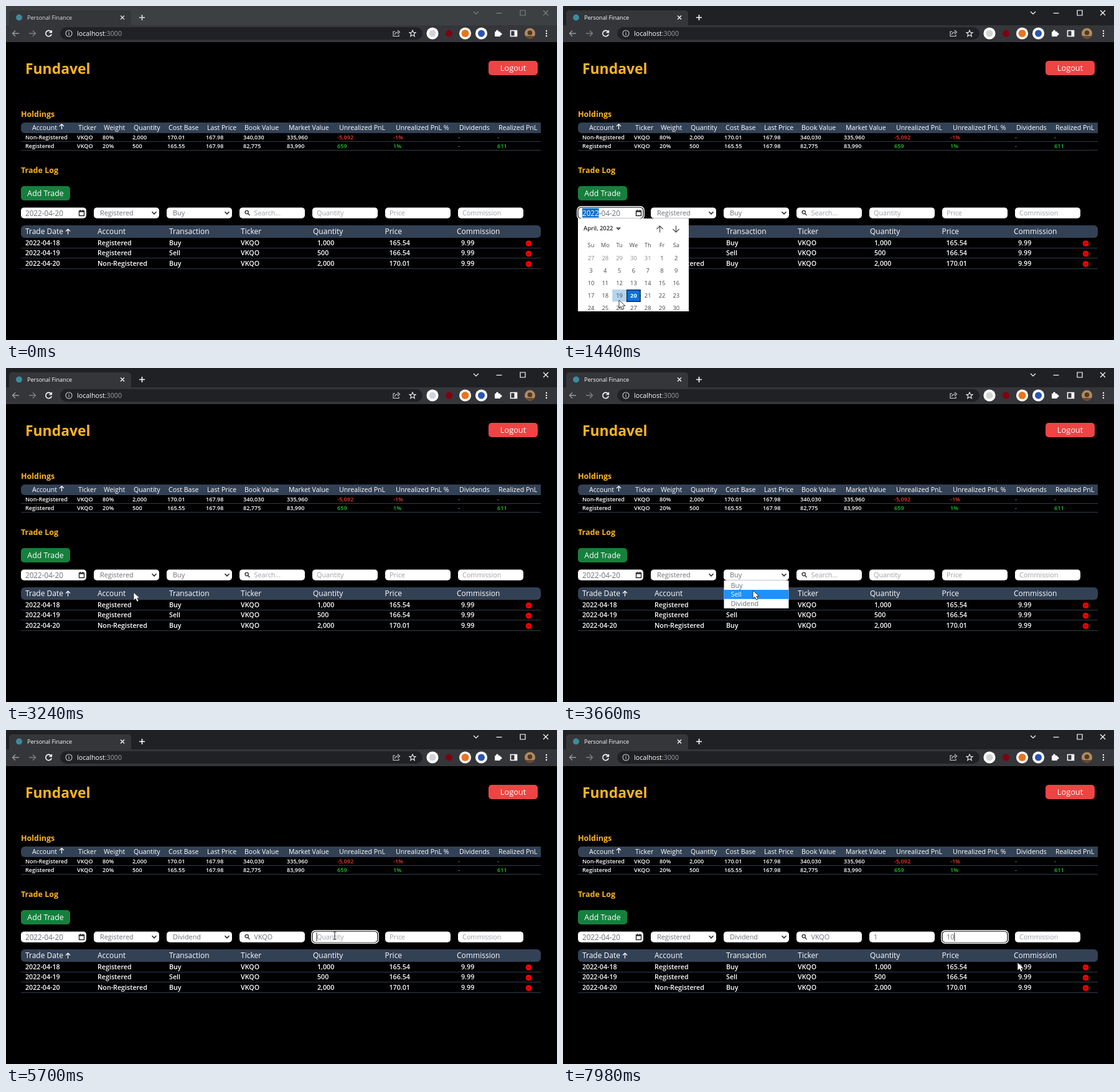
Write an HTML page with a canvas that moves like this. It is 885x536 px and loops after 8000 ms.

```html
<!DOCTYPE html>
<html lang="en">
<head>
<meta charset="utf-8">
<title>Personal Finance</title>
<style>
html, body { margin: 0; width: 100%; height: 100%; overflow: hidden; background: #000; }
canvas { display: block; }
</style>
</head>
<body>
<canvas id="stage" width="885" height="536"></canvas>
<script>
const c = document.getElementById('stage').getContext('2d');
const LOOP = 8000, STEP = 60;
const WHITE = '#fff', AMBER = '#fbb424', SLATE = '#334155', RULE = '#303c4c', INK = '#27272a';
const GREEN = '#22c52e', RED = '#f03a2e', MUTED = '#6b7078', HINT = '#9ca0a8', BLUE = '#1e90ff';
const TICKER = 'VKQO';

const HEADS = ['Account', 'Ticker', 'Weight', 'Quantity', 'Cost Base', 'Last Price', 'Book Value',
  'Market Value', 'Unrealized PnL', 'Unrealized PnL %', 'Dividends', 'Realized PnL'];
const HEAD_X = [42, 116, 157, 205, 261, 323, 383, 454, 535, 626, 728, 791];
const CELL_X = [31, 114, 155, 203, 259, 321, 381, 451, 532, 622, 726, 789];
const HOLDINGS = [
  ['Non-Registered', TICKER, '80%', '2,000', '170.01', '167.98', '340,030', '335,960', '-5,092', '-1%', '-', '-'],
  ['Registered', TICKER, '20%', '500', '165.55', '167.98', '82,775', '83,990', '659', '1%', '-', '611']
];
const LOG_HEADS = ['Trade Date', 'Account', 'Transaction', 'Ticker', 'Quantity', 'Price', 'Commission'];
const LOG_X = [31, 147, 262, 377, 493, 608.5, 724];
const LOG = [
  ['2022-04-18', 'Registered', 'Buy', TICKER, '1,000', '165.54', '9.99'],
  ['2022-04-19', 'Registered', 'Sell', TICKER, '500', '166.54', '9.99'],
  ['2022-04-20', 'Non-Registered', 'Buy', TICKER, '2,000', '170.01', '9.99']
];

// Pointer stops: time, x, y
const PATH = [
  [60, 2, 456], [660, 92, 332], [780, 92, 332], [960, 121, 331], [1080, 121, 331],
  [1440, 90, 472], [1740, 92, 470], [2040, 236, 331], [2160, 236, 331], [2400, 208, 363],
  [2640, 205, 360], [3240, 205, 360], [3420, 350, 331], [3480, 350, 331], [3660, 305, 357],
  [4020, 300, 374], [4140, 300, 374], [4380, 427, 331], [4920, 427, 331], [5160, 528, 330],
  [6420, 528, 330], [6720, 640, 330], [6780, 640, 330], [7080, 730, 373]
];

function text(s, x, y, size, color = WHITE, weight = 400, align = 'left') {
  c.font = `${weight} ${size}px "Open Sans", "Noto Sans", sans-serif`;
  c.fillStyle = color;
  c.textAlign = align;
  c.fillText(s, x, y + size * 0.36);
  return c.measureText(s).width;
}

function box(x, y, w, h, color, r = 0) {
  c.fillStyle = color;
  c.beginPath();
  c.roundRect(x, y, w, h, r);
  c.fill();
}

function disc(x, y, r, color) {
  c.fillStyle = color;
  c.beginPath();
  c.arc(x, y, r, 0, 7);
  c.fill();
}

function line(d, color, width = 1, x = 0, y = 0) {
  c.save();
  c.translate(x, y);
  c.strokeStyle = color;
  c.lineWidth = width;
  c.stroke(new Path2D(d));
  c.restore();
}

const rule = y => box(24, y, 835, 1, RULE);
const between = (t, a, b) => t >= a && t < b;
const upArrow = (x, y) => line('M0 4.5V-4M-3.5 -.5L0 -4L3.5 -.5', WHITE, 1.2, x, y);

function browser(active) {
  const on = active ? WHITE : '#dfe0e2', ctl = active ? WHITE : '#7c8084';
  const bar = '#35363a';
  box(0, 0, 885, 32, active ? '#202124' : '#3c4043');
  box(5, 7, 196, 30, bar, 5);
  box(0, 31, 885, 27, bar);
  disc(21, 18.5, 5, '#3a8c9c');
  text('Personal Finance', 34, 18.5, 9.1, on);
  line('M-3 -3L3 3M3 -3L-3 3', on, 1.3, 187, 18.5);
  line('M-4.5 0H4.5M0 -4.5V4.5', on, 1.6, 218.5, 18.5);
  line('M-4 -2L0 2L4 -2', ctl, 1.2, 755, 11);
  line('M-4.5 0H4.5', ctl, 1.2, 792, 11.5);
  line('M-4 -4H4V4H-4Z', ctl, 1.2, 830, 11);
  line('M-4 -4L4 4M4 -4L-4 4', ctl, 1.2, 867, 11);

  line('M5 0H-5M-1 -4.5L-5.5 0L-1 4.5', '#9a9ca0', 1.4, 16, 44);
  line('M-5 0H5M1 -4.5L5.5 0L1 4.5', '#7c8084', 1.4, 42, 44);
  line('M4 -2.5A4.7 4.7 0 1 0 4.6 1.2M4.8 -5V-1.5H1', WHITE, 1.6, 68.5, 44);
  box(87, 34, 582, 20, '#202124', 10);
  line('M5 0A5 5 0 1 1 -5 0A5 5 0 1 1 5 0M0 -.8V2.8M0 -3V-1.8', '#d0d2d5', 1.1, 101, 44);
  const w = text('localhost', 114, 44, 10.7, WHITE);
  text(':3000', 114 + w, 44, 10.7, '#9aa0a6');
  line('M-2 -3H-5V4.5H4V2M-2.5 2C-2 -1 0 -2 3 -2M2 -5L5.5 -2L2 1', '#d0d2d5', 1.1, 627, 44);
  line('M0 -5L1.5 -1.6L5 -1.4L2.3 1L3.2 4.6L0 2.6L-3.2 4.6L-2.3 1L-5 -1.4L-1.5 -1.6Z', '#e4e5e7', 1.2, 653, 44);

  for (const x of [685, 737.5, 763.5]) disc(x, 44, 9.6, WHITE);
  disc(685, 44, 5.5, '#d4d4d4');
  disc(711.5, 44, 5.5, '#800010');
  disc(737.5, 44, 6, '#e8741c');
  disc(763.5, 44, 5.5, '#2b55b0');
  box(785, 41, 9, 8, WHITE, 1);
  disc(789, 40.5, 2, WHITE);
  disc(794.5, 45, 2, WHITE);
  line('M-5 -4.5H5V4.5H-5Z', WHITE, 1.6, 815.5, 44);
  box(816.5, 40, 4, 8, WHITE);
  disc(841.5, 44, 8.5, '#b08a62');
  c.fillStyle = '#6b4a30';
  c.beginPath();
  c.arc(841.5, 44, 8.5, 0.5, 2.64);
  c.fill();
  disc(841.5, 43, 3.8, '#51391f');
  for (const y of [40, 44, 48]) disc(868, y, 1.2, WHITE);
}

function tables() {
  text('Fundavel', 31, 101, 22.9, AMBER, 700);
  box(775, 88, 79, 23, '#ef4444', 5);
  text('Logout', 814.5, 99.5, 12.8, WHITE, 400, 'center');

  text('Holdings', 24, 173, 12.5, AMBER, 700);
  box(24, 187, 835, 17, SLATE, [6, 0, 0, 6]);
  HEADS.forEach((s, i) => text(s, HEAD_X[i], 195.5, 10.6, WHITE, 500));
  upArrow(89.5, 193.5);
  HOLDINGS.forEach((row, r) => {
    row.forEach((s, i) => {
      const tint = i < 8 ? WHITE : i > 9 && s === '-' ? '#8a9099' : r ? GREEN : RED;
      text(s, CELL_X[i], 211 + r * 13.5, 9.1, tint, 600);
    });
    rule(217 + r * 14);
  });

  text('Trade Log', 24, 263.5, 12.5, AMBER, 700);
  box(24, 289, 79, 23, '#15803d', 5);
  text('Add Trade', 63.5, 300.5, 12.3, WHITE, 400, 'center');
  box(24, 352, 835, 20, SLATE, 6);
  LOG_HEADS.forEach((s, i) => text(s, LOG_X[i], 362, 12, WHITE, 500));
  upArrow(99.5, 362);
  LOG.forEach((row, r) => {
    const y = 380 + r * 16.5;
    row.forEach((s, i) => text(s, LOG_X[i] + (i > 3 ? 7 : 0), y, 10.7, WHITE, 600));
    disc(839.5, y + 1, 4.8, '#f00');
    box(837, y + 0.4, 5, 1.3, '#7a0000');
    rule(Math.floor(388 + r * 16.5));
  });
}

function field(i, focused) {
  const x = 24 + i * 117;
  if (focused) {
    box(x - 2, 321, 109, 22, WHITE, 7);
    box(x - 0.6, 322.4, 106.2, 19.2, '#000', 6);
  }
  box(x + (focused ? 0.6 : 0), 323.4, focused ? 103.8 : 105, 17.4, WHITE, 5);
}

// Text input with placeholder, typed keys and a blinking caret
function input(i, t, hint, value, keys, from, to) {
  const focused = between(t, from, to), n = keys.filter(k => t >= k).length;
  const x = 24 + i * 117 + (i === 3 ? 23.5 : 7);
  field(i, focused);
  const shown = value.slice(0, n);
  const w = text(shown || hint, x, 332.3, 10.8, n ? MUTED : HINT);
  const last = n ? keys[n - 1] : from;
  if (focused && Math.floor((t - last) / 300) % 2 === 0) box(x + (n ? w : -0.5), 325, 1, 14, INK);
}

function select(i, value) {
  const x = 24 + i * 117;
  field(i);
  text(value, x + 10, 332.5, 10.9, MUTED);
  line('M-3.5 -1.8L0 1.8L3.5 -1.8', INK, 1.6, x + 97, 332);
}

function menu(x, items, pointerY) {
  const h = 14.6;
  box(x, 341, 104, items.length * h + 1, WHITE);
  const hover = Math.floor((pointerY - 341) / h);
  items.forEach((s, i) => {
    if (i === hover) box(x, 341.5 + i * h, 104, h, BLUE);
    text(s, x + 11, 349 + i * h, 10.8, i === hover ? WHITE : MUTED);
  });
}

function form(t) {
  const dateFocus = between(t, 1020, 2100);
  field(0, dateFocus);
  if (dateFocus) box(31, 324.5, 26.5, 15, '#0a6cc8');
  const w = text('2022', 31, 332.3, 11.7, dateFocus ? WHITE : MUTED);
  text('-04-20', 31 + w, 332.3, 11.7, MUTED);
  line('M-4 -3H4V4.5H-4ZM-4 -2H4M-2 -5V-3M2 -5V-3', INK, 1.4, 121.5, 332);
  select(1, 'Registered');
  select(2, t < 4140 ? 'Buy' : 'Dividend');
  input(3, t, 'Search...', TICKER, [4500, 4620, 4740, 4860], 4380, 5100);
  line('M2.3 -1A2.6 2.6 0 1 1 -2.9 -1A2.6 2.6 0 1 1 2.3 -1M1.6 1L4.5 4', INK, 1.3, 387, 332);
  input(4, t, 'Quantity', '1', [6240], 5100, 6780);
  input(5, t, 'Price', '10', [7920, 7980], 6780, LOOP);
  input(6, t, 'Commission', '', [], LOOP, LOOP);
}

function calendar(p) {
  const dark = '#48484c';
  c.save();
  c.beginPath();
  c.rect(24, 341, 178, 149);
  c.clip();
  box(24, 341, 178, 149, WHITE);
  text('April, 2022', 33, 357, 9.3, INK, 600);
  line('M-2.5 -1H2.5L0 1.8Z', INK, 1.2, 89, 357);
  line('M0 5.5V-5M-5 0L0 -5L5 0', dark, 1.2, 155.5, 358);
  line('M0 -5.5V5M-5 0L0 5L5 0', dark, 1.2, 181.5, 358);
  for (let col = 0; col < 7; col++) {
    const x = 45 + col * 22.8;
    text(['Su', 'Mo', 'Tu', 'We', 'Th', 'Fr', 'Sa'][col], x, 384, 9.3, dark, 400, 'center');
    for (let row = 0; row < 5; row++) {
      const y = 405 + row * 20, n = row * 7 + col - 4, chosen = n === 20;
      if (chosen) {
        box(x - 11.5, y - 10, 23, 20, '#0c2c58');
        box(x - 10, y - 8.5, 20, 17, '#0b72e0');
      } else if (Math.abs(p.x - x) < 11.4 && between(p.y, y - 10, y + 10) || n === 19 && p.y > 455) {
        box(x - 11.4, y - 10, 23, 19.5, '#b5d5ef');
      }
      text(n > 0 ? n : n + 31, x, y, 9.4, chosen ? WHITE : n > 0 ? dark : '#8c8c90',
        chosen ? 700 : 400, 'center');
    }
  }
  c.restore();
}

function pointerAt(t) {
  const i = PATH.findIndex(k => k[0] > t);
  if (i < 0) return { x: 730, y: 373 };
  if (i === 0) return null;
  const [a, x, y] = PATH[i - 1], [b, u, v] = PATH[i];
  let f = (t - a) / (b - a);
  f = f * f * (3 - 2 * f);
  return { x: x + (u - x) * f, y: y + (v - y) * f };
}

function pointer({ x, y }) {
  if (between(y, 323, 341) && between(x, 375, 714)) {
    line('M-2.5 -6H2.5M0 -6V6M-2.5 6H2.5', INK, 1, x, y);
    return;
  }
  const shape = new Path2D('M0 0V13L3.2 10.2L5.5 15L8 13.8L5.8 9.2H10Z');
  c.save();
  c.translate(x, y);
  c.fillStyle = WHITE;
  c.strokeStyle = INK;
  c.fill(shape);
  c.lineWidth = 0.9;
  c.stroke(shape);
  c.restore();
}

function draw(now) {
  const t = Math.floor(now % LOOP / STEP) * STEP;
  const p = pointerAt(t);
  box(0, 0, 885, 536, '#000');
  browser(t >= 840);
  tables();
  form(t);
  if (between(t, 1020, 2100)) calendar(p);
  if (between(t, 2100, 3240)) menu(141.5, ['Registered', 'Non-Registered'], p.y);
  if (between(t, 3480, 4140)) menu(258.5, ['Buy', 'Sell', 'Dividend'], p.y);
  if (p) pointer(p);
}

const start = performance.now();
function tick() {
  draw(performance.now() - start);
  requestAnimationFrame(tick);
}
tick();
</script>
</body>
</html>
```
